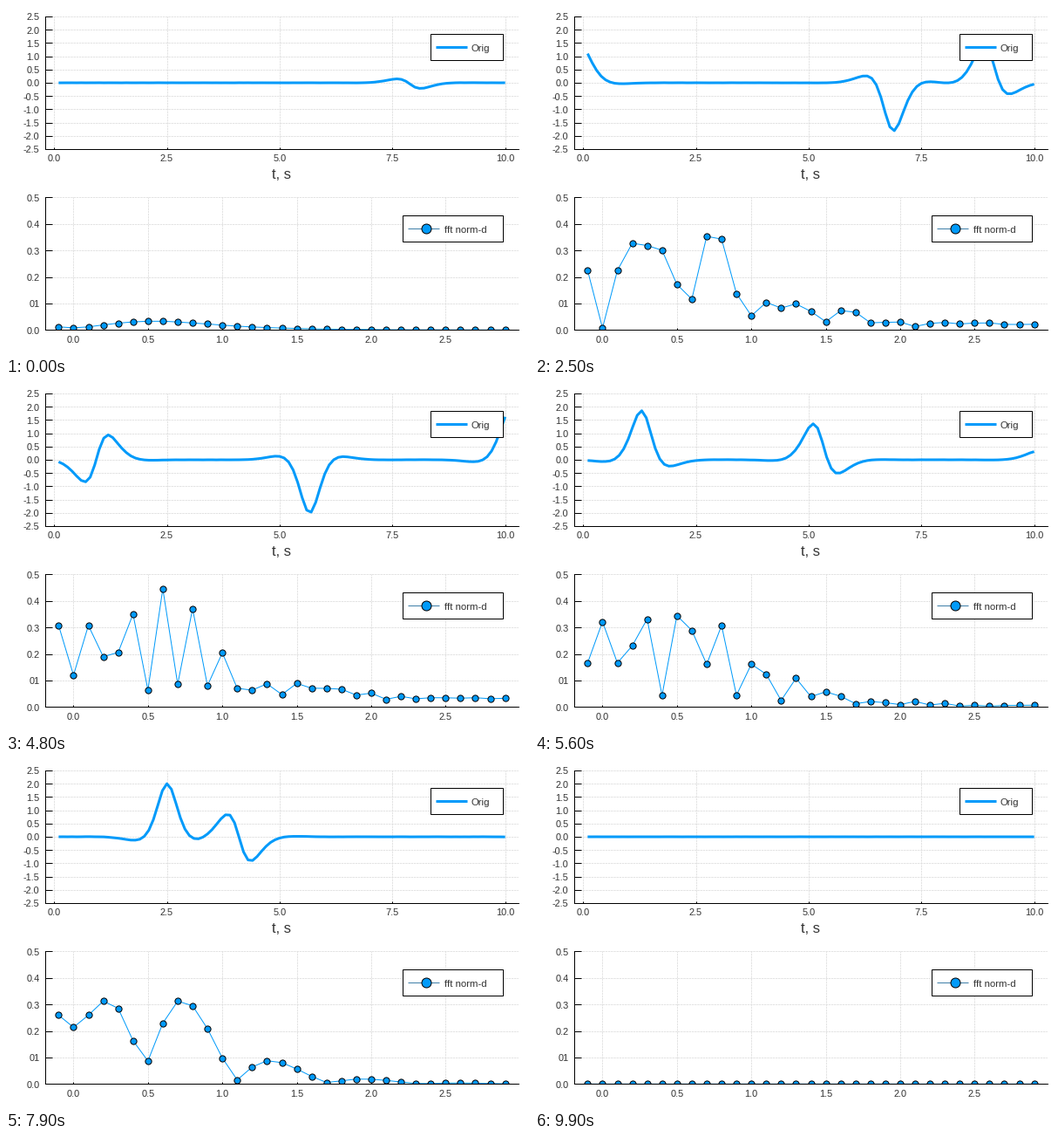
Recreate the animation shown at these times as a matplotlib script. Size 600 by 400 pixels, loop 10 s.

```python
import numpy as np
import matplotlib.pyplot as plt
from matplotlib.animation import FuncAnimation

W, H, DPI = 600, 400, 100
PX = 72 / DPI
BLUE, INK, GRID = "#009afa", "#333333", "#dcdcdc"
N = 100  # samples in space and in time
LEFT, RIGHT = 45, 588

plt.rcParams["font.family"] = "Liberation Sans"


def soliton_traces(h=0.05, steps=80):
    """Real part of an NLS soliton bouncing between walls: [time, position].

    Strang splitting on the odd periodic extension of the box, with the
    three-point Laplacian of a grid of spacing h.
    """
    size = round(20 / h)
    x = h * np.arange(size)

    def pulse(s):
        return 2 / np.cosh(2 * (s - 3)) * np.exp(1j * (s - 3))

    psi = pulse(x) - pulse(20 - x)
    dt = 0.1 / steps
    k = 2 * np.pi * np.fft.fftfreq(size, h)
    drift = np.exp(-1j * dt * (2 - 2 * np.cos(k * h)) / h**2)
    stride = round(0.1 / h)
    rows = []
    for _ in range(N):
        for _ in range(steps):
            psi = psi * np.exp(1j * dt * np.abs(psi) ** 2)
            psi = np.fft.ifft(drift * np.fft.fft(psi))
            psi = psi * np.exp(1j * dt * np.abs(psi) ** 2)
        rows.append(psi.real[::stride][1:N + 1])
    return np.array(rows)


fig = plt.figure(figsize=(W / DPI, H / DPI), dpi=DPI, facecolor="white")


def text(x, y, s, size=11, ha="center"):
    fig.text(x / W, 1 - y / H, s, fontsize=size * PX, color=INK, ha=ha,
             va="center_baseline")


def panel(top, bottom, xlim, ylim, xticks, yticks, ylabels):
    ax = fig.add_axes([LEFT / W, 1 - bottom / H,
                       (RIGHT - LEFT) / W, (bottom - top) / H])
    ax.set(xlim=xlim, ylim=ylim, xticks=xticks, yticks=yticks)
    ax.set_axisbelow(True)
    ax.patch.set_visible(False)
    ax.grid(color=GRID, lw=0.8 * PX, ls=(0, (3, 1)))
    for side in ("top", "right"):
        ax.spines[side].set_visible(False)
    for side in ("left", "bottom"):
        ax.spines[side].set_linewidth(PX)
    ax.tick_params(direction="in", width=PX, labelleft=False,
                   labelbottom=False)
    ax.tick_params(axis="x", length=2.5 * PX)
    ax.tick_params(axis="y", length=8 * PX)
    for v in xticks:
        px = LEFT + (v - xlim[0]) / (xlim[1] - xlim[0]) * (RIGHT - LEFT)
        text(px, bottom + 10.3, f"{v:.1f}")
    for v, label in zip(yticks, ylabels):
        py = bottom - (v - ylim[0]) / (ylim[1] - ylim[0]) * (bottom - top)
        text(38.5, py + 0.5, label, ha="right")
    return ax


def legend(x0, y0, x1, y1, line, label, label_x, **style):
    layer = fig.add_axes([0, 0, 1, 1], zorder=5)
    layer.set(xlim=(0, W), ylim=(H, 0))
    layer.axis("off")
    layer.add_patch(plt.Rectangle((x0, y0), x1 - x0, y1 - y0, fc="white",
                                  ec="black", lw=PX))
    mid = (y0 + y1) / 2
    layer.plot(line, [mid, mid], solid_capstyle="butt", **style)
    layer.text(label_x, mid + 0.5, label, fontsize=11.4 * PX, color=INK,
               va="center_baseline")
    return layer, mid


u = soliton_traces()
t = 0.1 * np.arange(1, N + 1)
freq = 0.1 * np.arange(-1, 30)
spectrum = np.abs(np.fft.fft(u, axis=0)) / 40

levels = np.arange(-2.5, 2.6, 0.5)
wave_ax = panel(12, 164, (-0.197, 10.297), (-2.5, 2.5),
                [0, 2.5, 5, 7.5, 10], levels, [f"{v:.1f}" for v in levels])
fft_ax = panel(219.2, 371.4, (-0.19, 2.99), (0, 0.5),
               np.arange(0, 2.6, 0.5), np.arange(6) / 10,
               ["0.0", "01", "0.2", "0.3", "0.4", "0.5"])
text(316, 191.8, "t, s", 16.5)

wave, = wave_ax.plot([], [], color=BLUE, lw=3 * PX, solid_capstyle="butt")
dots, = fft_ax.plot([], [], color=BLUE, lw=PX, marker="o", ms=7.2 * PX,
                    mfc=BLUE, mec="black", mew=PX)

legend(487, 32, 570, 62, (493, 529), "Orig", 533.7,
       color=BLUE, lw=3 * PX)
box, mid = legend(455, 240, 570, 270, (461, 497), "fft norm-d",
                  502.7, color="#3f7fa8", lw=PX)
box.plot(482, mid, "o", ms=11 * PX, mfc=BLUE, mec="black", mew=PX)


def update(i):
    wave.set_data(t, u[:, i])
    dots.set_data(freq, spectrum[np.arange(-1, 30), i])
    return wave, dots


anim = FuncAnimation(fig, update, frames=N, interval=100, repeat=True,
                     repeat_delay=0, blit=False)
plt.show()
```
